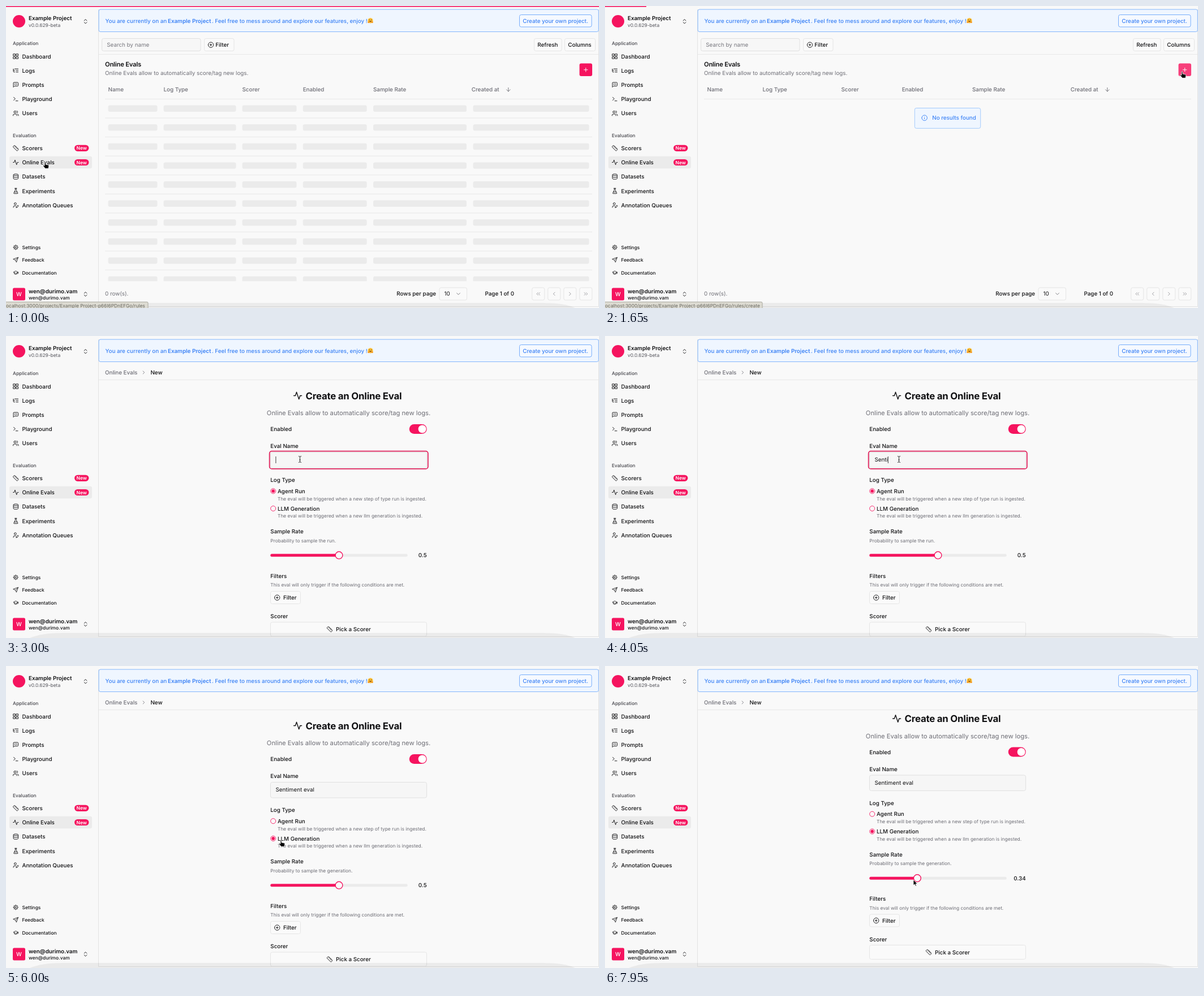
Write an HTML page that moves like this. It is 1048 px wide and 534 px high and loops after 8 s.

```html
<!DOCTYPE html>
<html lang="en">
<head>
<meta charset="utf-8">
<title>Online Evals</title>
<style>
html, body { margin: 0; width: 100%; height: 100%; overflow: hidden; background: #f9f9f9; }
svg { display: block; width: 1048px; height: 534px; }
text { font-family: Inter, "Liberation Sans", sans-serif; white-space: pre; text-rendering: geometricPrecision; }
</style>
</head>
<body>
<svg id="stage" viewBox="0 0 1048 534"></svg>
<script>
const PINK = '#f5145f', INK = '#111113', MUTED = '#6d6d75', BLUE = '#3b82f6', LINE = '#e5e5e5';

const ICONS = {
  grid: 'M3 3h7v7H3zM14 3h7v7h-7zM14 14h7v7h-7zM3 14h7v7H3z',
  tree: 'M21 12h-8M21 6H8M21 18h-8M3 6v4c0 1.1.9 2 2 2h3M3 10v6c0 1.1.9 2 2 2h3',
  message: 'M21 15a2 2 0 0 1-2 2H7l-4 4V5a2 2 0 0 1 2-2h14a2 2 0 0 1 2 2zM10 7.5 8 10l2 2.5M14 7.5l2 2.5-2 2.5',
  terminal: 'M4 17l6-6-6-6M12 19h8',
  users: 'M16 21v-2a4 4 0 0 0-4-4H6a4 4 0 0 0-4 4v2M22 21v-2a4 4 0 0 0-3-3.9M16 3.1a4 4 0 0 1 0 7.8M5 7a4 4 0 1 0 8 0 4 4 0 1 0-8 0',
  ruler: 'M21.3 15.3a2.4 2.4 0 0 1 0 3.4l-2.6 2.6a2.4 2.4 0 0 1-3.4 0L2.7 8.7a2.4 2.4 0 0 1 0-3.4l2.6-2.6a2.4 2.4 0 0 1 3.4 0ZM14.5 12.5l2-2M11.5 9.5l2-2M8.5 6.5l2-2M17.5 15.5l2-2',
  activity: 'M22 12h-4l-3 9L9 3l-3 9H2',
  database: 'M3 5a9 3 0 0 0 18 0 9 3 0 0 0-18 0v14a9 3 0 0 0 18 0V5M3 12a9 3 0 0 0 18 0',
  flask: 'M10 2v7.3L4.7 19.6A1.6 1.6 0 0 0 6 22h12a1.6 1.6 0 0 0 1.3-2.4L14 9.3V2M8.5 2h7M7 16h10',
  userPen: 'M11.5 15H7a4 4 0 0 0-4 4v2M21.4 16.6a2 2 0 0 0-3-3l-4 4-1.3 4.3 4.3-1.3zM6 7a4 4 0 1 0 8 0 4 4 0 1 0-8 0',
  gear: 'M4 12a8 8 0 1 0 16 0 8 8 0 1 0-16 0M9 12a3 3 0 1 0 6 0 3 3 0 1 0-6 0M12 1.5V4M12 20v2.5M1.5 12H4M20 12h2.5M4.6 4.6l1.7 1.7M17.7 17.7l1.7 1.7M4.6 19.4l1.7-1.7M17.7 6.3l1.7-1.7',
  send: 'M22 2l-7 20-4-9-9-4zM22 2 11 13',
  cap: 'M22 10 12 5 2 10l10 5zM6 12v5c3 3 9 3 12 0v-5M22 10v6',
  upDown: 'M7 15l5 5 5-5M7 9l5-5 5 5',
  plus: 'M5 12h14M12 5v14',
  circlePlus: 'M2 12a10 10 0 1 0 20 0 10 10 0 1 0-20 0M8 12h8M12 8v8',
  info: 'M2 12a10 10 0 1 0 20 0 10 10 0 1 0-20 0M12 16v-4M12 8v.1',
  arrowDown: 'M12 5v14M19 12l-7 7-7-7',
  down: 'M6 9l6 6 6-6',
  right: 'M9 18l6-6-6-6',
  left: 'M15 18l-6-6 6-6',
  lefts: 'M11 17l-5-5 5-5M18 17l-5-5 5-5',
  rights: 'M6 17l5-5-5-5M13 17l5-5-5-5'
};

const text = (x, y, s, size = 9.8, weight = 500, color = INK, extra = '') =>
  `<text x="${x}" y="${y}" font-size="${size}" font-weight="${weight}" fill="${color}" ${extra}>${s}</text>`;
const rect = (x, y, w, h, fill, rx = 0, stroke = 'none', extra = '') =>
  `<rect x="${x}" y="${y}" width="${w}" height="${h}" fill="${fill}" rx="${rx}" stroke="${stroke}" ${extra}/>`;
const icon = (name, x, y, size = 11.2, color = INK) =>
  `<path d="${ICONS[name]}" transform="translate(${x - size / 2} ${y - size / 2}) scale(${size / 24})"
    fill="none" stroke="${color}" stroke-width="2" stroke-linecap="round" stroke-linejoin="round"/>`;
const circle = (x, y, r, fill, extra = '') => `<circle cx="${x}" cy="${y}" r="${r}" fill="${fill}" ${extra}/>`;
const button = (x, y, w, h = 22) => rect(x, y, w, h, '#fafafa', 3, LINE);
const rule = (y, x1 = 164, x2 = 1047) => rect(x1, y - .5, x2 - x1, 1, '#e8e8e8');
const group = (id, body, extra = '') => `<g id="${id}" ${extra}>${body}</g>`;

function sidebar() {
  const items = [
    [89, 'grid', 'Dashboard'], [114, 'tree', 'Logs'], [139.3, 'message', 'Prompts'],
    [164.5, 'terminal', 'Playground'], [189.7, 'users', 'Users'],
    [251.3, 'ruler', 'Scorers', 1], [276.5, 'activity', 'Online Evals', 1], [301.7, 'database', 'Datasets'],
    [327, 'flask', 'Experiments'], [352, 'userPen', 'Annotation Queues']
  ];
  const links = [[426.7, 'gear', 'Settings'], [449, 'send', 'Feedback'], [471.5, 'cap', 'Documentation']];
  return rect(0, 0, 163.5, 534, '#f8f8f8') +
    circle(23, 27, 11, PINK) +
    text(40, 25, 'Example Project', 9.8, 600) + text(40, 36.6, 'v0.0.629-beta', 8.4, 400, '#55555c') +
    icon('upDown', 140.5, 27.3) +
    text(12, 69.2, 'Application', 8.4, 500, '#45454b') + text(12, 231.7, 'Evaluation', 8.4, 500, '#45454b') +
    rect(6, 265.8, 146, 21.4, '#ebebeb', 3) +
    items.map(([y, name, label, fresh]) => icon(name, 17.3, y) + text(28.5, y + 3.5, label) +
      (fresh ? rect(121, y - 5.6, 25.4, 11.2, PINK, 5.6) + text(133.7, y + 3, 'New', 8.4, 600, '#fff', 'text-anchor="middle"') : '')).join('') +
    links.map(([y, name, label]) => icon(name, 17.2, y, 10) + text(28.5, y + 3, label, 8.4)).join('') +
    rect(12, 498.5, 22, 22, PINK, 2.5) + text(23, 513.2, 'W', 9.8, 500, '#fff', 'text-anchor="middle"') +
    text(40, 507.5, 'wen@durimo.vam', 9.8, 600) + text(40, 518.8, 'wen@durimo.vam', 8.4, 450) +
    icon('upDown', 140.5, 509.5);
}

function banner() {
  return rect(164, 6, 883.3, 39.5, '#eff6ff', 3, '#84b6fb') +
    text(175.5, 29.6, 'You are currently on an', 9.8, 450, BLUE) +
    text(286, 29.6, 'Example Project', 9.8, 600, BLUE) +
    text(363.8, 29.6, '. Feel free to mess around and explore our features, enjoy !', 9.8, 450, BLUE) +
    circle(644, 25.8, 4.6, '#fbbf35') +
    '<path d="M641.6 26.5q2.4 3.4 4.8 0z" fill="#7a3f12"/>' +
    circle(642.3, 24.4, .6, '#5b3210') + circle(645.7, 24.4, .6, '#5b3210') +
    circle(640.8, 28.6, 1.7, '#f49a25') + circle(647.2, 28.6, 1.7, '#f49a25') +
    rect(907.5, 15.5, 127.5, 21.5, '#f5f9ff', 3, '#76adfb') +
    text(913.3, 29.6, 'Create your own project.', 9.8, 500, BLUE);
}

function listPage() {
  const columns = [[180.5, 87, 'Name'], [278.5, 128, 'Log Type'], [417.5, 96, 'Scorer'],
    [524.7, 113, 'Enabled'], [649, 165, 'Sample Rate'], [825.5, 205, 'Created at']];
  let bones = '';
  for (let i = 0; i < 10; i++) {
    const y = 175.6 + 33.6 * i;
    bones += columns.map(([x, w]) => rect(x, y, w, 11.4, '#ebebeb', 3)).join('') + rule(y + 22.4, 175, 1036);
  }
  const pager = [['lefts', 940.7], ['left', 968.7], ['right', 996.8], ['rights', 1024.8]];
  return rect(169.5, 57.5, 174.5, 22, '#f7f7f7', 3, '#e0e0e0') + text(178.3, 72.2, 'Search by name', 9.8, 400, '#77777e') +
    button(350.5, 57.5, 52.5) + icon('circlePlus', 362, 68.7) + text(370.3, 72.2, 'Filter') +
    button(933.5, 57.5, 48.5) + text(939.3, 72.2, 'Refresh') +
    button(987.5, 57.5, 54) + text(993.3, 72.2, 'Columns') + rule(85.5) +
    text(175, 106.7, 'Online Evals', 11.2, 600, INK, 'letter-spacing="-.018em"') +
    text(175, 121.8, 'Online Evals allow to automatically score/tag new logs.', 9.8, 400, MUTED) +
    rect(1013.5, 101.6, 22.5, 22.4, PINK, 3, 'none', 'id="add"') + icon('plus', 1024.7, 112.8, 11.2, '#fff') +
    columns.map(([x, , label]) => text(label === 'Created at' ? 822.8 : x, 151.3, label, 9.8, 500, MUTED)).join('') +
    icon('arrowDown', 887.8, 147.8, 11.2, MUTED) + rule(164.5, 175, 1036) +
    group('bones', bones, 'clip-path="url(#rows)"') +
    group('empty', rect(547.3, 180.5, 116.4, 35.8, '#eff6ff', 3, '#a3cafc') + icon('info', 564.6, 197.8, 11.4, BLUE) +
      text(578.3, 200.8, 'No results found', 9.8, 500, BLUE)) +
    text(175, 512.4, '0 row(s).', 9.8, 400, MUTED) + text(690.3, 512.4, 'Rows per page') +
    button(766, 498, 48.5) + text(774.5, 512.4, '10', 9.8, 400) + icon('down', 799.5, 509, 11.2, '#77777c') +
    text(846.5, 512.4, 'Page 1 of 0') +
    pager.map(([name, x]) => button(x - 11, 498, 22) + icon(name, x, 509, 11.2, '#9c9ca1')).join('');
}

function formPage() {
  const radio = (id, y, label, note) => circle(472.2, y, 4.5, '#fafafa', `stroke="${PINK}" stroke-width=".9"`) +
    circle(472.2, y, 2.9, PINK, `id="${id}"`) + text(480, y + 3.6, label) + text(480, y + 16.4, note, 8.4, 400, MUTED);
  const form = icon('activity', 515.6, 105.5, 16.8) +
    text(529.5, 111.6, 'Create an Online Eval', 16.8, 700, INK, 'letter-spacing="-.012em"') +
    text(605.5, 140.3, 'Online Evals allow to automatically score/tag new logs.', 11.2, 400, MUTED, 'text-anchor="middle"') +
    text(467.3, 168, 'Enabled') + rect(712.7, 156, 31, 17, PINK, 8.5) + circle(735.6, 164.5, 7, '#fff') +
    text(467.3, 198.2, 'Eval Name') +
    rect(467.5, 205.5, 276, 27.5, '#f6f6f6', 3, '#e0e0e0') +
    rect(465.7, 203.7, 280.1, 31.2, 'none', 4, '#e0245e', 'id="ring" stroke-width="1.8"') +
    text(476.5, 222.4, '', 9.8, 400, INK, 'id="typed"') + rect(0, 213, .8, 12, INK, 0, 'none', 'id="caret"') +
    text(467.3, 258.4, 'Log Type') +
    radio('run', 274.2, 'Agent Run', 'The eval will be triggered when a new step of type run is ingested.') +
    radio('llm', 305, 'LLM Generation', 'The eval will be triggered when a new llm generation is ingested.') +
    text(467.3, 349.4, 'Sample Rate') + text(467.3, 364.8, '', 8.4, 400, MUTED, 'id="rateNote"') +
    rect(467.3, 385.2, 242.4, 5, '#ebebeb', 2.5) + rect(467.3, 385.2, 0, 5, PINK, 2.5, 'none', 'id="fill"') +
    circle(0, 387.7, 6.4, '#fafafa', `id="thumb" stroke="${PINK}" stroke-width="1.4"`) +
    text(743.6, 391.2, '', 9.8, 500, INK, 'id="rate" text-anchor="end"') +
    text(467.3, 427.8, 'Filters') + text(467.3, 443, 'This eval will only trigger if the following conditions are met.', 8.4, 400, MUTED) +
    button(467.5, 451.5, 53) + icon('circlePlus', 479.2, 462.6) + text(490, 466.2, 'Filter') +
    text(467.3, 499.2, 'Scorer') + button(467.5, 506, 276, 25) + icon('ruler', 572, 518.5) + text(583, 522.2, 'Pick a Scorer');
  return text(175, 68, 'Online Evals', 9.8, 450, MUTED) + icon('right', 243.4, 64.5, 10, MUTED) + text(255.4, 68, 'New') +
    rule(77.5) + `<g clip-path="url(#view)">${group('form', form)}</g>` +
    rect(1041, 91.5, 5, 439.5, '#7f7f7f', 2.5, 'none', 'id="scrollbar"');
}

const cursors =
  group('arrow', '<path d="M0 0V9.8L2.2 7.8 3.8 11.2 5.4 10.4 3.9 7.2H7Z" stroke-width=".8"/>') +
  group('hand', '<path d="M-1 .8C-1-.5 1-.5 1 .8V4L5.5 5C6.6 5.3 6.9 6 6.7 7L6 11.3H.2L-3.4 6.8C-4 5.6-2.6 4.9-1.8 5.8L-1 6.6Z" stroke-width=".8"/>') +
  group('beam', '<path d="M-2.5-5.5Q0-5.5 0-4V4Q0 5.5-2.5 5.5M2.5-5.5Q0-5.5 0-4V4Q0 5.5 2.5 5.5M-1.3 1H1.3" fill="none" style="stroke:#333"/>');

const stage = document.getElementById('stage');
stage.innerHTML =
  '<clipPath id="rows"><rect x="164" y="165" width="884" height="321.5"/></clipPath>' +
  '<clipPath id="view"><rect x="164" y="78" width="884" height="453"/></clipPath>' +
  rect(0, 0, 1048, 534, '#f9f9f9') + sidebar() +
  '<path d="M163.5 6V531.5H1047.5V6" fill="none" stroke="#e2e2e2"/>' + banner() +
  group('list', listPage()) + group('page', formPage()) +
  '<path d="M42 534C62 526 80 525 110 525H940C970 525 988 526 1006 534Z" fill="#000" opacity=".055"/>' +
  rect(0, 0, 0, 1.6, PINK, 0, 'none', 'id="bar"') +
  group('tip', rect(-4, 523.3, 0, 14, '#dddbd2', 2, '#aaa9a0', 'id="tipBox"') +
    text(-2, 533.4, '', 8.4, 400, '#66665f', 'id="tipText"')) +
  group('cursor', cursors, 'fill="#000" stroke="#fff" stroke-linejoin="round"');

const el = {};
stage.querySelectorAll('[id]').forEach(node => el[node.id] = node);
const set = (id, name, value) => el[id].setAttribute(name, value);
const show = (id, alpha) => set(id, 'opacity', +alpha);

// Eased value at t from rows of [time, ...values].
function track(keys, t) {
  const i = keys.findIndex(k => k[0] > t);
  if (i === 0) return keys[0].slice(1);
  if (i < 0) return keys[keys.length - 1].slice(1);
  const a = keys[i - 1], b = keys[i];
  const u = (t - a[0]) / (b[0] - a[0]), e = u * u * (3 - 2 * u);
  return a.slice(1).map((v, j) => v + (b[j + 1] - v) * e);
}
// Last value whose start time has passed.
const stepAt = (steps, t) => steps.filter(s => s[0] <= t).pop()[1];

const POINTER = [[450, 69, 276], [1500, 1020, 116], [1800, 1020, 116], [2100, 449.5, 198], [2550, 519.5, 218],
  [5250, 519.5, 218], [5850, 486, 308], [6750, 486, 308], [7200, 588, 378], [7350, 588, 378], [7950, 545, 378]];
const SHAPE = [[0, 'hand'], [750, 'arrow'], [1500, 'hand'], [1950, 'arrow'], [2400, 'beam'],
  [5550, 'arrow'], [5700, 'hand'], [6900, 'arrow']];
const TYPED = [[0, 0], [3450, 1], [3750, 2], [3900, 4], [4050, 5], [4200, 7], [4350, 8], [4500, 10],
  [4650, 11], [4800, 12], [4950, 13], [5100, 14]];
const BAR = [[0, 1048], [300, 0], [1650, 73], [1800, 330], [1950, 0]];

function draw(t) {
  const onForm = t >= 1950, llm = t >= 5850;
  show('list', !onForm);
  show('page', onForm);
  show('bones', t < 150);
  show('empty', t >= 150);
  set('add', 'fill', t >= 1500 ? '#f73f7b' : PINK);
  set('bar', 'width', stepAt(BAR, t));
  show('bar', t === 150 ? .5 : 1);

  const creating = t >= 1500;
  set('tipBox', 'width', creating ? 282 : 255);
  el.tipText.textContent = 'localhost:3000/projects/Example Project-p66I6PDnEFGo/rules' + (creating ? '/create' : '');
  show('tip', track([[600, 1], [900, 0], [1350, 0], [1500, 1], [1950, 1], [2250, 0]], t)[0]);

  const focus = t >= 2700 && !llm;
  show('ring', focus ? (t < 2850 ? .5 : 1) : 0);
  el.typed.textContent = 'Sentiment eval'.slice(0, stepAt(TYPED, t));
  set('caret', 'x', 476.5 + el.typed.getComputedTextLength());
  show('caret', focus && t >= 2850);
  show('run', !llm);
  show('llm', llm);
  el.rateNote.textContent = `Probability to sample the ${llm ? 'generation' : 'run'}.`;

  const rate = Math.round(track([[7200, .5], [7950, .34]], t)[0] * 100) / 100;
  const x = 474 + rate * 229;
  set('thumb', 'cx', x);
  set('fill', 'width', x - 467.3);
  el.rate.textContent = rate;
  set('form', 'transform', `translate(0 ${t >= 6600 ? -12.5 : 0})`);
  show('scrollbar', t < 6600 ? 0 : track([[7050, 1], [7350, 0]], t)[0]);

  const shape = stepAt(SHAPE, t);
  for (const id of ['arrow', 'hand', 'beam']) show(id, id === shape);
  set('cursor', 'transform', `translate(${track(POINTER, t).join(' ')})`);
}

const start = performance.now();
(function frame() {
  const t = (performance.now() - start) % 8000;
  draw(Math.floor(t / 150) * 150);
  requestAnimationFrame(frame);
})();
</script>
</body>
</html>
```
